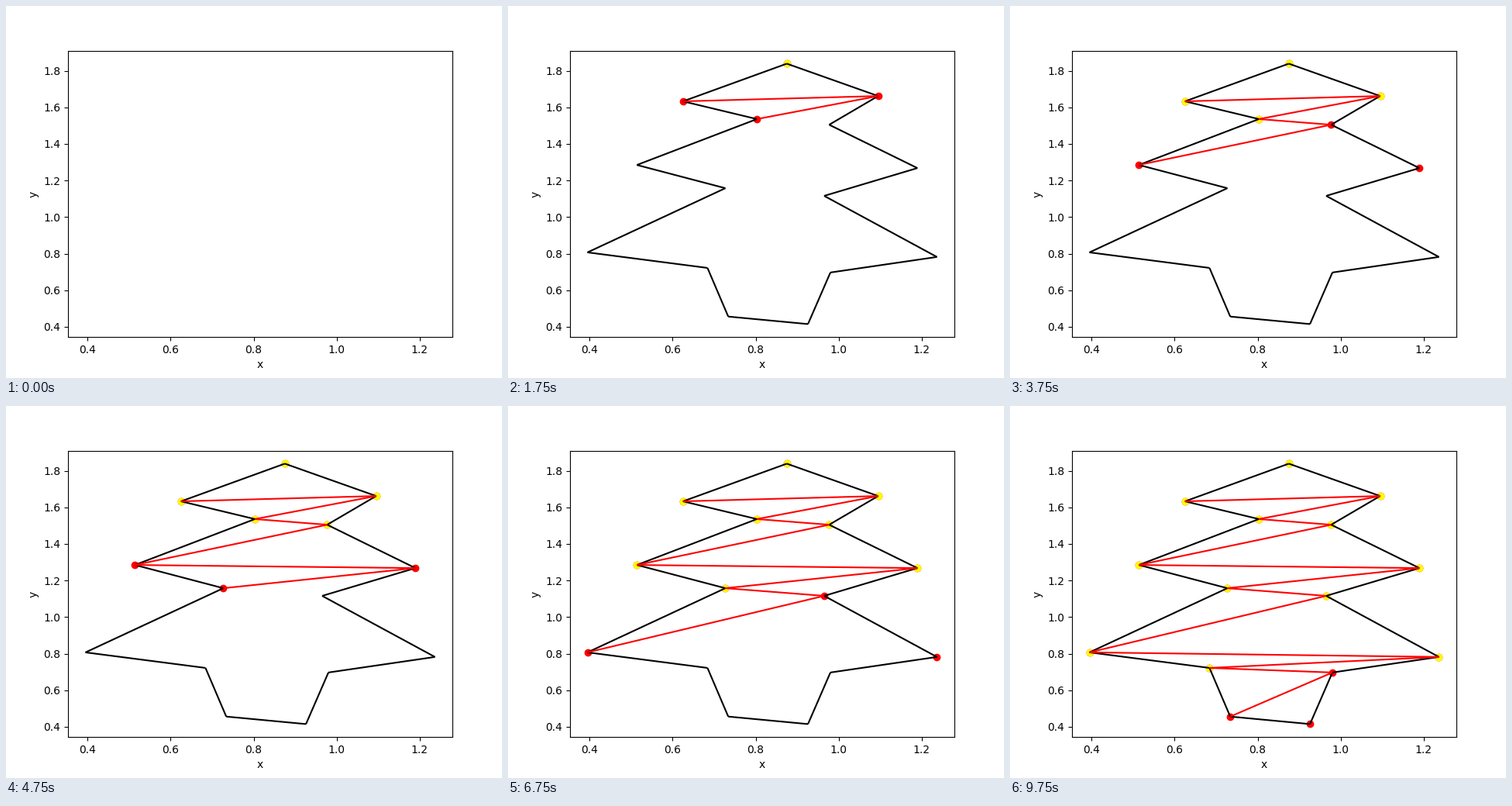
Recreate the animation shown at these times as a matplotlib script. Size 640 by 480 pixels, loop 10 s.

```python
import matplotlib.pyplot as plt
from matplotlib.animation import FuncAnimation
from matplotlib.collections import LineCollection

# Corners of a y-monotone polygon, each chain from top to bottom
TOP, BOTTOM = (0.875, 1.839), (0.926, 0.415)
LEFT = [(0.625, 1.633), (0.803, 1.536), (0.514, 1.285), (0.727, 1.158),
        (0.395, 0.807), (0.684, 0.722), (0.734, 0.456)]
RIGHT = [(1.095, 1.662), (0.977, 1.505), (1.1895, 1.268), (0.965, 1.116),
         (1.2365, 0.782), (0.980, 0.697)]

fig, ax = plt.subplots(figsize=(6.4, 4.8), dpi=100)
ax.set_xlabel("x")
ax.set_ylabel("y")
artists = []


def add_points(points, color):
    artists.append(ax.scatter(*zip(*points), color=color))


def add_segments(segments, color):
    artists.append(ax.add_collection(LineCollection(segments, colors=color)))


def triangulate():
    """Sweep from top to bottom, adding one artist per step."""
    outline = [TOP] + LEFT + [BOTTOM] + RIGHT[::-1]
    add_segments(list(zip(outline, outline[1:] + outline[:1])), "black")

    order = sorted(outline, key=lambda p: -p[1])
    stack = order[:2]
    add_points(stack, "red")
    for point in order[2:-1]:
        add_points([point], "red")
        top = stack[-1]
        if (point in LEFT) != (top in LEFT):
            targets, done = stack[1:], stack[:-1]
            stack = [top, point]
        else:
            targets, done = [stack[-2]], [top]
            stack[-1] = point
        for target in targets:
            add_segments([(target, point)], "red")
        for old in done:
            add_points([old], "yellow")
    add_points([order[-1]], "red")


triangulate()
ax.autoscale_view()


def update(step):
    for i, artist in enumerate(artists):
        artist.set_visible(i < step)
    return artists


anim = FuncAnimation(fig, update, frames=len(artists) + 1, interval=250,
                     repeat=True, repeat_delay=0, blit=False)
plt.show()
```
